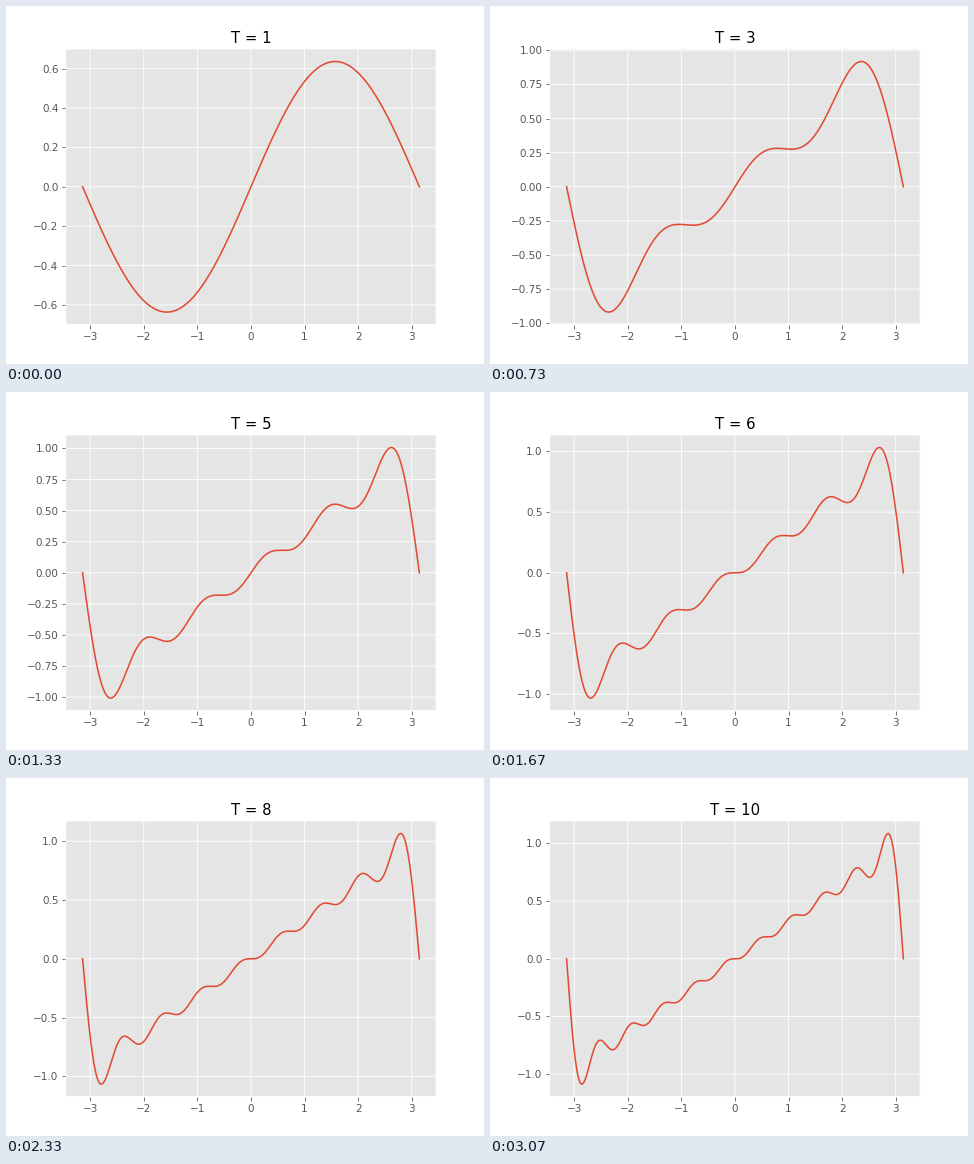
A matplotlib script that plays this animation: 478x358 px, repeating every 3.34 s.

```python
import numpy as np
import matplotlib.pyplot as plt
from matplotlib.animation import FuncAnimation

STEP_MS = 20
FRAMES = 167
TERMS = 10

plt.style.use("ggplot")
plt.rcParams["path.snap"] = False

x = np.linspace(-np.pi, np.pi, 1000)


def partial_sum(terms):
    """Fourier series of x / pi, cut off after the given number of terms."""
    n = np.arange(1, terms + 1)[:, None]
    return 2 / np.pi * np.sum((-1.0) ** (n + 1) * np.sin(n * x) / n, axis=0)


curves = [partial_sum(k) for k in range(1, TERMS + 1)]

fig, ax = plt.subplots(figsize=(6.4, 4.79331), dpi=74.6875)
line, = ax.plot(x, curves[0], lw=1.5)
title = ax.set_title("T = 1")


def update(frame):
    # one more term every third of a second
    k = min((3 * frame + 2) // 50, TERMS - 1)
    line.set_ydata(curves[k])
    title.set_text(f"T = {k + 1}")
    ax.relim()
    ax.autoscale_view()
    return line, title


anim = FuncAnimation(fig, update, frames=FRAMES, interval=STEP_MS,
                     init_func=lambda: update(0), repeat=True, repeat_delay=0)
plt.show()
```
